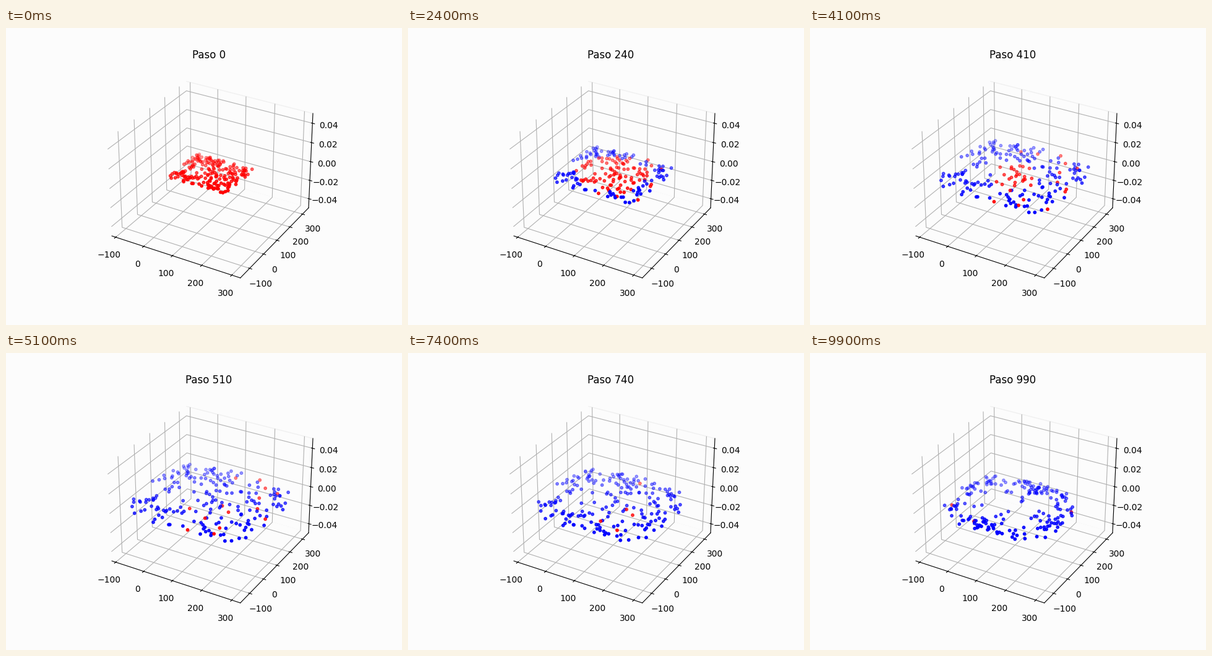
A matplotlib script for the animation above (10000 ms loop, 640 by 480 pixels).

```python
import numpy as np
import matplotlib.pyplot as plt
from matplotlib.animation import FuncAnimation

FRAMES, INTERVAL = 100, 100
COUNT = 205
PEAK = 54  # frame at which the cloud is widest
BG = "#fcfcfc"

rng = np.random.default_rng(12)
square = rng.uniform(-1, 1, (COUNT, 2))
u, v = square.T
disc = np.column_stack([u * np.sqrt(1 - v**2 / 2), v * np.sqrt(1 - u**2 / 2)])
depth = np.hypot(*disc.T)
drift = rng.normal(0, 8, (COUNT, 2))

# The colour change runs from the rim to the core, with a few stragglers
turn = 50 - 42 * depth**1.7 + rng.normal(0, 1.5, COUNT)
late = rng.random(COUNT) < 0.1 * (1 + u)
turn[late] = rng.uniform(45, 84, late.sum())
relapse = np.arange(COUNT) % 70 == 9


def smooth(t):
    t = np.clip(t, 0, 1)
    return t * t * (3 - 2 * t)


def positions(k):
    """Burst outwards, then hollow out, clump and shrink while drifting."""
    s = k / (FRAMES - 1)
    grow = smooth(k / PEAK)
    fall = max(0, (k - PEAK) / (FRAMES - 1 - PEAK))

    shape = square + 0.5 * grow * (disc - square)
    shape = shape * depth[:, None] ** (0.9 * s - 1.45 * s**2)
    radius = np.hypot(*shape.T)
    angle = np.arctan2(shape[:, 1], shape[:, 0])
    shift = angle + np.radians(8)
    angle = angle - fall * (0.18 * np.sin(4 * shift) - 0.16 * np.sin(2 * shift))

    half_x = 100 + 115 * grow - 36 * fall
    half_y = 100 + 130 * grow - 54 * fall
    x = 100 + 16 * s + half_x * radius * np.cos(angle) + s * drift[:, 0]
    y = 100 - 56 * s**1.7 + half_y * radius * np.sin(angle) + s * drift[:, 1]
    return x, y


fig = plt.figure(figsize=(6.4, 4.8), dpi=100, facecolor=BG)
ax = fig.add_subplot(projection="3d", facecolor=BG)
ax.set_xlim(-114, 328)
ax.set_ylim(-165, 350)
ax.set_zlim(-0.05, 0.05)
ax.set_xticks(range(-100, 301, 100))
ax.set_yticks(range(-100, 301, 100))
ax.set_zticks(np.linspace(-0.04, 0.04, 5))
for axis in (ax.xaxis, ax.yaxis, ax.zaxis):
    axis.set_pane_color(BG)
ax.yaxis.pane.set_edgecolor("#f0f0f0")

dots = []


def update(k):
    while dots:
        dots.pop().remove()
    x, y = positions(k)
    red = (k < turn) | (relapse & (k > 92))
    colors = np.where(red, "red", "blue")
    dots.append(ax.scatter(x, y, np.zeros(COUNT), c=colors, s=10))
    ax.set_title(f"Paso {10 * k}")
    return dots


anim = FuncAnimation(fig, update, frames=FRAMES, interval=INTERVAL,
                     init_func=lambda: update(0), repeat=True,
                     repeat_delay=0, blit=False)
plt.show()
```
